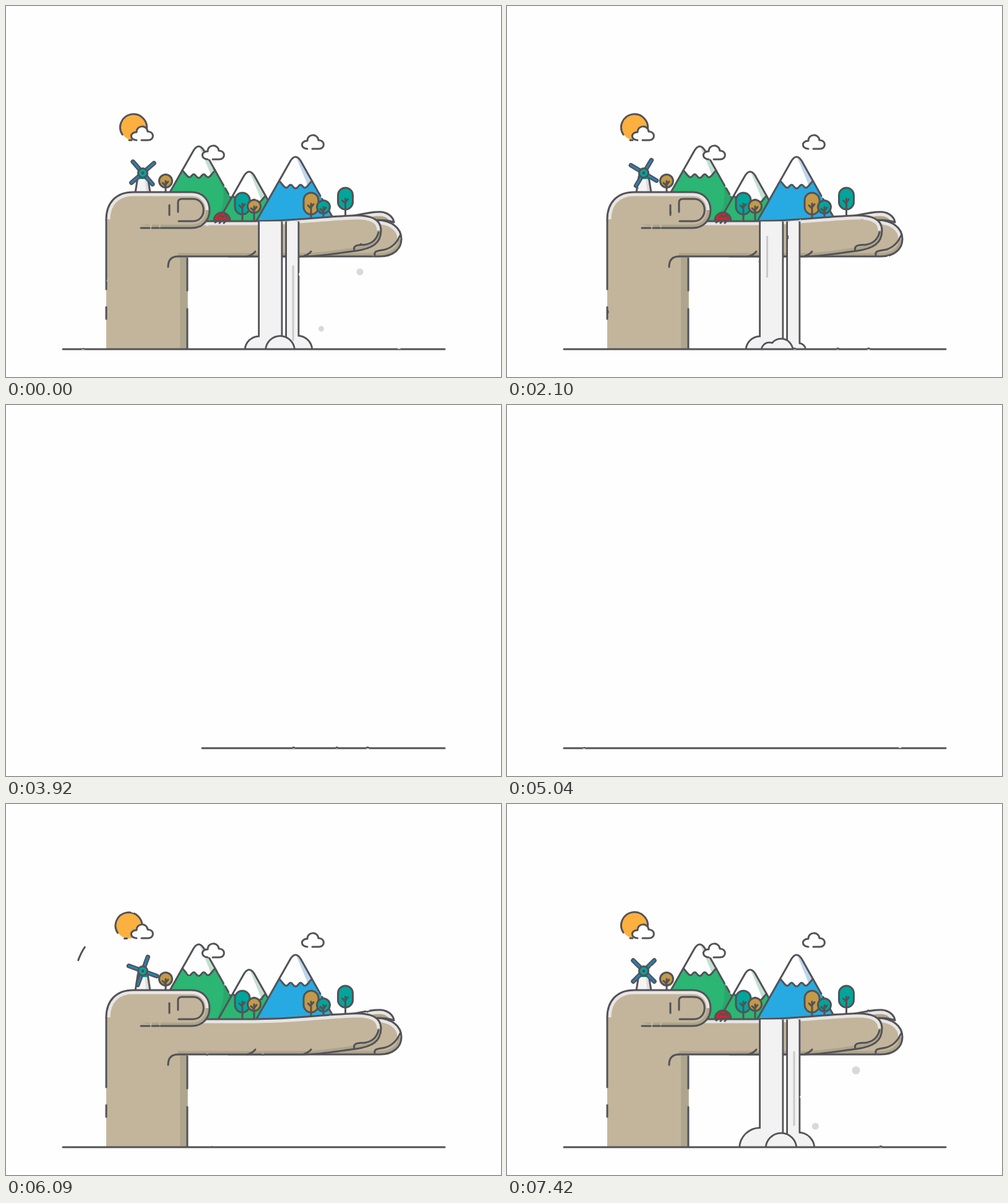
These frames come from a looping animation (800x600 px, 7.49 s). An HTML page:

```html
<!DOCTYPE html>
<html lang="en">
<head>
<meta charset="utf-8">
<title>Landscape in a hand</title>
<style>
  html, body { margin: 0; width: 100%; height: 100%; overflow: hidden; background: #fefefe; }
  svg { display: block; width: 800px; height: 600px; }
  .ink { fill: none; stroke: #525257; stroke-width: 3; stroke-linecap: round; stroke-linejoin: round; }
  .light { fill: none; stroke: #e8e5e3; stroke-width: 13; }
  .shade { fill: none; stroke: #ada48d; stroke-width: 11; }
  .skin { fill: #c2b59b; }
  .edge { fill: none; stroke: #525257; stroke-width: 5.6; }
  .wet { fill: #f2f2f3; }
  .streak { stroke: #c9c9cb; stroke-width: 3; stroke-linecap: round; }
</style>
</head>
<body>
<svg viewBox="0 0 800 600">
  <defs>
    <filter id="rough" filterUnits="userSpaceOnUse" x="0" y="0" width="800" height="600" color-interpolation-filters="sRGB">
      <feTurbulence id="noise" type="fractalNoise" baseFrequency=".1" numOctaves="1" seed="1"/>
      <feDisplacementMap in="SourceGraphic" scale="1.8" xChannelSelector="R" yChannelSelector="G"/>
    </filter>
    <clipPath id="aboveGround"><rect width="800" height="555"/></clipPath>
    <clipPath id="waterClip"><rect id="waterBox" x="300" width="300"/></clipPath>
    <g id="falls">
      <rect x="410" y="330" width="34.5" height="240"/>
      <rect x="454" y="330" width="17.5" height="240"/>
      <circle id="foamLeft" cx="409" cy="557"/>
      <circle id="foamRight" cx="471" cy="557"/>
    </g>
    <g id="foam">
      <circle id="foamMid" cx="443" cy="557"/>
      <circle id="foamSmall" cx="424" cy="557"/>
    </g>
  </defs>
  <g filter="url(#rough)">
    <g id="world" clip-path="url(#aboveGround)">
      <g id="body"></g>
      <g id="water" clip-path="url(#waterClip)">
        <use href="#falls" class="edge"/><use href="#falls" class="wet"/>
        <line id="streakA" class="streak" x1="420.5" x2="420.5"/>
        <line id="streakB" class="streak" x1="464" x2="464"/>
        <use href="#foam" class="edge"/><use href="#foam" class="wet"/>
      </g>
      <g id="drops" fill="#d9d9da"><circle/><circle/></g>
      <path id="trail" class="ink" d="M106 300 Q112 254 127 232 Q150 200 206 196" pathLength="1"/>
      <g id="sun">
        <circle r="21" fill="#fbb040"/>
        <path class="ink" d="M-18 12 A21.5 21.5 0 1 1 21 5 M-7 21 H-3"/>
      </g>
      <g id="sky"></g>
    </g>
    <line id="ground" class="ink" y1="555" y2="555"/>
  </g>
</svg>
<script>
const LOOP = 7490, STEP = 70;
const GREEN = '#2bb673', BLUE = '#27aae1', TEAL = '#00a59b', GOLD = '#c39a48';
const $ = id => document.getElementById(id);
const set = (el, attrs) => { for (const k in attrs) el.setAttribute(k, attrs[k]); };
const move = (el, x, y, more = '') => el.setAttribute('transform', `translate(${x} ${y}) ${more}`);
const smooth = u => u * u * (3 - 2 * u);
const linear = u => u;

// Value at time t of a track written as time, value, time, value, ...
function key(t, track, ease = smooth) {
  if (t <= track[0]) return track[1];
  for (let i = 2; i < track.length; i += 2) {
    if (t < track[i]) {
      const u = (t - track[i - 2]) / (track[i] - track[i - 2]);
      return track[i - 1] + (track[i + 1] - track[i - 1]) * ease(u);
    }
  }
  return track[track.length - 1];
}

// Blend the numbers of two paths with the same commands.
function mix(a, b, k) {
  const goal = b.match(/[\d.]+/g);
  let i = 0;
  return a.replace(/[\d.]+/g, n => (+n + (goal[i++] - n) * k).toFixed(2));
}

// Upper edge and tip of each limb, relaxed and then bent upwards.
const limbs = {
  low: [
    ['M540 350 L600 346 C622 347 639 358 639 377', ' C639 393 626 405 604 405 C480 405 420 405 360 405'],
    ['M540 350 L600 350 C615 350 630 352 631 362', ' C632 380 622 388 604 390 C500 409 420 413 360 405']],
  back: [
    ['M530 345 C570 338 590 332 606 333 C617 334 626 341 627 350', ' C620 347 610 346 600 346 L600 380'],
    ['M530 338 C560 322 585 302 604 301 C626 301 636 312 636 325', ' C636 342 622 355 606 357 L590 360']],
  front: [
    ['M215 348 L400 348 C460 348 510 341 558 339 C590 337 606 345 606 363',
     ' C606 384 592 392 566 396 C540 399 510 405 480 405 C450 405 430 405 400 405 L278 405'],
    ['M215 347 L360 347 C440 350 500 344 540 335 C575 325 606 330 606 355',
     ' C606 380 592 386 566 390 C540 394 500 402 470 405 C440 408 410 405 390 405 L278 405']],
  thumb: [
    ['M162 345 C162 318 178 301 206 301 H300 C318 301 329 314 329 330',
     ' C329 346 318 359 300 359 H250 M247 359 H236 M232 359 H218']]
};
const nails = {
  lowNail: ['M596 404 C594 395 602 396 612 394 C624 391 632 382 637 371',
            'M606 355 C611 352 617 350 621 346 C629 340 632 332 631 318'],
  frontNail: ['M563 395 C560 386 570 387 580 386 C592 384 599 378 602 366',
              'M566 387 C564 378 572 378 582 376 C592 374 600 366 604 352']
};

const shapes = { ...nails };
for (const name in limbs) {
  const [a, b = a] = limbs[name];
  const start = top => 'M' + top.split(' ').slice(-2).join(' ');
  shapes[name] = [a.join(''), b.join('')];
  shapes[name + 'Top'] = [a[0], b[0]];
  shapes[name + 'Tip'] = [start(a[0]) + a[1], start(b[0]) + b[1]];
}

const shape = (name, cls) => `<path data-shape="${name}" class="${cls}"/>`;
const ink = d => `<path class="ink" d="${d}"/>`;
const limb = name => `
  <clipPath id="${name}Clip">${shape(name, '')}</clipPath>
  ${shape(name, 'skin')}
  <g clip-path="url(#${name}Clip)">${shape(name + 'Tip', 'shade')}${shape(name + 'Top', 'light')}</g>
  ${shape(name, 'ink')}`;

// Movable pieces carry their resting place and the height of their overshoot.
const piece = (x, y, lift, inner) =>
  `<g class="piece" data-x="${x}" data-y="${y}" data-lift="${lift}">${inner}</g>`;

function mountain(x, apex, lift, length, color, frost, dark = 'none') {
  const half = length * 0.567;
  const zig = 'C-23 49 -19 58 -15 58 C-12 58 -11 53 -8 53 C-5 53 -4 59 0 59 ' +
    'C4 59 5 53 8 53 C11 53 12 58 15 58 C19 58 23 49 26.6 47';
  return piece(x, apex, lift, `
    <path fill="${color}" d="M${-half} ${length} L-8 14 Q0 2 8 14 L${half} ${length}Z"/>
    <path fill="${dark}" d="M32 56 C42 75 44 95 30 128 H72.5Z"/>
    <path fill="#fefefe" d="M-26.6 47 ${zig} L8 14 Q0 2 -8 14Z"/>
    <path fill="${frost}" d="M1 9 L8 14 L26.6 47 L20 56 L16 45Z"/>
    ${ink(`M${-half} ${length} L-8 14 Q0 2 8 14 L40 71 M43 76 L48 85 M51 90 L80 141`)}
    ${ink('M-26.6 47 ' + zig)}`);
}

function tree(x, y, tall, color, foot, lift) {
  const w = tall ? 12 : 10.5, h = tall ? 17.5 : 10.5;
  return piece(x, y, lift, `
    <rect class="ink" style="fill:${color}" x="${-w}" y="${-h}" width="${2 * w}" height="${2 * h}" rx="${w}"/>
    ${ink(`M0 ${foot - y} V0 M0 8 L-5 3 M0 6 L4 1`)}`);
}

const cloud = (x, y, peak) => `<g data-x="${x}" data-y="${y}" data-peak="${peak}">
  <path class="ink" style="fill:#fefefe"
    d="M-9 9 C-20 9 -21 -4 -9 -4 C-9 -16 8 -16 9 -5 C20 -5 20 9 10 9 H-1"/></g>`;

const blades = [0, 90, 180, 270].map(a => `<g transform="rotate(${a})">
  <path d="M8 0 H24" stroke="#525257" stroke-width="7.5" stroke-linecap="round"/>
  <path d="M8 0 H24" stroke="#2583b7" stroke-width="3" stroke-linecap="round"/></g>`).join('');

$('body').innerHTML = `
  ${mountain(311.5, 219, -16, 165, GREEN, '#c3dfd2', '#28a869')}
  ${mountain(393, 260, -25, 124, GREEN, '#c3dfd2')}
  ${mountain(468, 236, -29, 150, BLUE, '#bdd5ec')}
  ${tree(258, 283, false, GOLD, 302, -6)}
  ${tree(382, 319.5, true, TEAL, 348, -7)}
  ${tree(401, 324, false, GOLD, 348, -9)}
  ${tree(493, 319.5, true, GOLD, 346, -7)}
  ${tree(513, 325, false, TEAL, 344, -9)}
  ${tree(548.5, 311.5, true, TEAL, 341, -6)}
  <path fill="#f4f4f4" d="M209 302 L213 276 Q215 267 221 267 Q227 267 229 276 L233 302Z"/>
  <path fill="#dddddf" d="M224 280 H230 L233 302 H227Z"/>
  <path fill="${TEAL}" d="M212.5 280 L213 276 Q215 267 221 267 Q227 267 229 276 L229.5 280Z"/>
  ${ink('M209 302 L213 276 Q215 267 221 267 Q227 267 229 276 L233 302')}
  ${piece(221, 270, -31, `<g id="mill">${blades}</g>
    <circle class="ink" style="fill:${TEAL}" r="7.5"/><circle r="2.5" fill="#525257"/>`)}
  ${limb('low')}${limb('back')}${shape('lowNail', 'ink')}
  <path class="skin" d="M162 345 H294 V900 H162Z"/>
  <path fill="#aea58e" d="M281 400 H293 V900 H281Z"/>
  ${ink('M162 345 V458 M162 487 V506 M293 408 V460 M293 490 V900')}
  ${limb('front')}${shape('frontNail', 'ink')}
  ${ink('M262 422 C262 410 268 405 278 405 M390 405 Q398 403 403 397 M482 404 Q489 402 493 397')}
  ${limb('thumb')}
  ${ink('M278 333 V318 Q278 312 284 312 H302 C325 312 325 348 302 348 H279 M264 322 V338')}
  <g id="bug">
    <path class="ink" style="fill:#ed1c24" d="M-13 0 A13 13 0 0 1 13 0Z"/>
    ${ink('M-6 -5 L-2 -9 L1 -5 L5 -9 L8 -4 M-9 2 L-11 3 M-2 2 L-4 4 M5 2 L3 4')}
  </g>`;

$('sky').innerHTML = cloud(220, 208, -50) + cloud(335, 239, -65) + cloud(496, 222, -55);

const shapeEls = [...document.querySelectorAll('[data-shape]')];
const pieces = [...document.querySelectorAll('.piece')];
const clouds = [...$('sky').children];

function drawHand(t) {
  const rise = key(t, [3290, 0, 3360, -8, 3640, 340, 5110, 340, 5390, 6, 5460, 2, 5600, 0]);
  const bend = key(t, [3290, 0, 3430, .4, 3640, .8, 5110, -.4, 5250, -.3, 5460, 1, 5670, -.12, 5810, 0]);
  const lift = key(t, [5250, 0, 5460, 1, 5670, -.15, 5810, 0]);
  move($('body'), 0, rise);
  for (const el of shapeEls) {
    const [a, b] = shapes[el.dataset.shape];
    el.setAttribute('d', mix(a, b, bend));
  }
  for (const el of pieces) {
    const { x, y, lift: peak } = el.dataset;
    move(el, x, +y + peak * lift);
  }
  const spin = key(t, [0, 49, 2100, 121, 2940, 151.5, 3850, 185, 5180, -25, 5460, 20, 6090, 110, 7420, 225, LOOP, 229], linear);
  $('mill').setAttribute('transform', `rotate(${spin})`);
  const pop = t < 4000 ? 1 : key(t, [6230, 0, 6370, 1.15, 6440, 1]);
  move($('bug'), 349, 347, `scale(${pop})`);
  return rise;
}

function drawSky(t, rise) {
  const leaving = t < 4000;
  const hop = key(t, [3150, 0, 3290, -36, 3430, -20]);
  const away = key(t, [3290, 0, 3640, 1]);
  clouds.forEach((el, i) => {
    const { x, y, peak } = el.dataset;
    const dx = leaving ? away * (i < 2 ? -400 : 340) : 0;
    const dy = leaving ? hop : rise + peak * key(t, [5180, 0, 5460, 1, 5810, 0]);
    move(el, +x + dx, +y + dy);
  });

  const u = leaving ? 1 : key(t, [5740, 0, 6138, 1]), v = 1 - u;
  const sx = v * v * 104 + 2 * u * v * 110 + u * u * 206;
  const sy = v * v * 320 + 2 * u * v * 200 + u * u * 196;
  move($('sun'), sx - (leaving ? away * 400 : 0), sy + (leaving ? hop : 0), `scale(${Math.min(1, 3 * u)})`);

  const tail = key(t, [5880, 0, 6160, .355]), head = key(t, [5810, 0, 6160, .5]);
  const shown = t > 5810 && t < 6160;
  set($('trail'), {
    'stroke-dasharray': `${head - tail} 2`, 'stroke-dashoffset': -tail,
    visibility: shown ? 'inherit' : 'hidden'
  });
}

// A streak of light runs down a fall, its tail starting after a delay.
function drawStreak(el, t, starts, delay) {
  const start = starts.find(s => t >= s && t < s + delay + 700);
  const u = t - start;
  const head = Math.min(548, 348 + .3 * u), tail = 348 + .28 * Math.max(0, u - delay);
  const shown = start !== undefined && tail < head;
  set(el, { y1: tail, y2: head, visibility: shown ? 'inherit' : 'hidden' });
}

function drawWater(t) {
  const w = t < 4000 ? t + LOOP : t;
  const top = key(w, [10640, 348.5, 10920, 555]);
  const bottom = key(w, [6230, 348.5, 6600, 555], u => u * u);
  set($('waterBox'), { y: top, height: Math.max(0, bottom - top) });

  const radius = (id, ...track) => $(id).setAttribute('r', key(w, [6600, 0, ...track, 10920, 0]));
  radius('foamLeft', 6850, 29, 7420, 32, 7490, 21.5, 10640, 21.5);
  radius('foamRight', 6850, 28, 7420, 24.5, 7490, 22.5, 7770, 10.5, 10640, 10.5);
  radius('foamMid', 6850, 27, 7420, 23.5, 7490, 22, 7770, 17.5, 10640, 17.5);
  radius('foamSmall', 7490, 0, 7770, 11.5, 10640, 11.5);

  drawStreak($('streakA'), w - LOOP, [875, 1800, 2725], 212);
  drawStreak($('streakB'), w - LOOP, [-640, 700], 380);

  // Ballistic drops: launch x, sideways and upward speed, frames in the air, frames of life.
  const launch = [[472, 8, 20, 11.5, 18], [427, 11, 10.4, 6.5, 12]];
  launch.forEach(([x, vx, vy, age, life], i) => {
    const n = age + (w - 7420) / STEP;
    const r = n < 0 ? 0 : Math.max(0, Math.min(8, life - n));
    set($('drops').children[i], { cx: x + vx * n, cy: 555 - vy * n + .8 * n * n, r });
  });
}

function drawGround(t) {
  const x1 = t < 4235
    ? key(t, [3640, 92, 3710, 102, 3780, 140, 3850, 211, 3920, 317, 3990, 440, 4060, 560, 4130, 655, 4200, 709], linear)
    : 92;
  const x2 = t < 4235 ? 709 : key(t, [4270, 92, 5040, 709]);
  set($('ground'), { x1, x2, visibility: x2 - x1 > .5 ? 'visible' : 'hidden' });
}

function draw(t) {
  const shown = t < 3710 || t >= 5180;
  $('world').setAttribute('visibility', shown ? 'visible' : 'hidden');
  if (shown) {
    drawSky(t, drawHand(t));
    drawWater(t);
  }
  drawGround(t);
  $('noise').setAttribute('seed', 1 + Math.floor(t / 210) % 4);
}

const begin = performance.now();
let last = -1;
function tick() {
  const t = Math.floor(((performance.now() - begin) % LOOP) / STEP) * STEP;
  if (t !== last) draw(last = t);
  requestAnimationFrame(tick);
}
tick();
</script>
</body>
</html>
```
